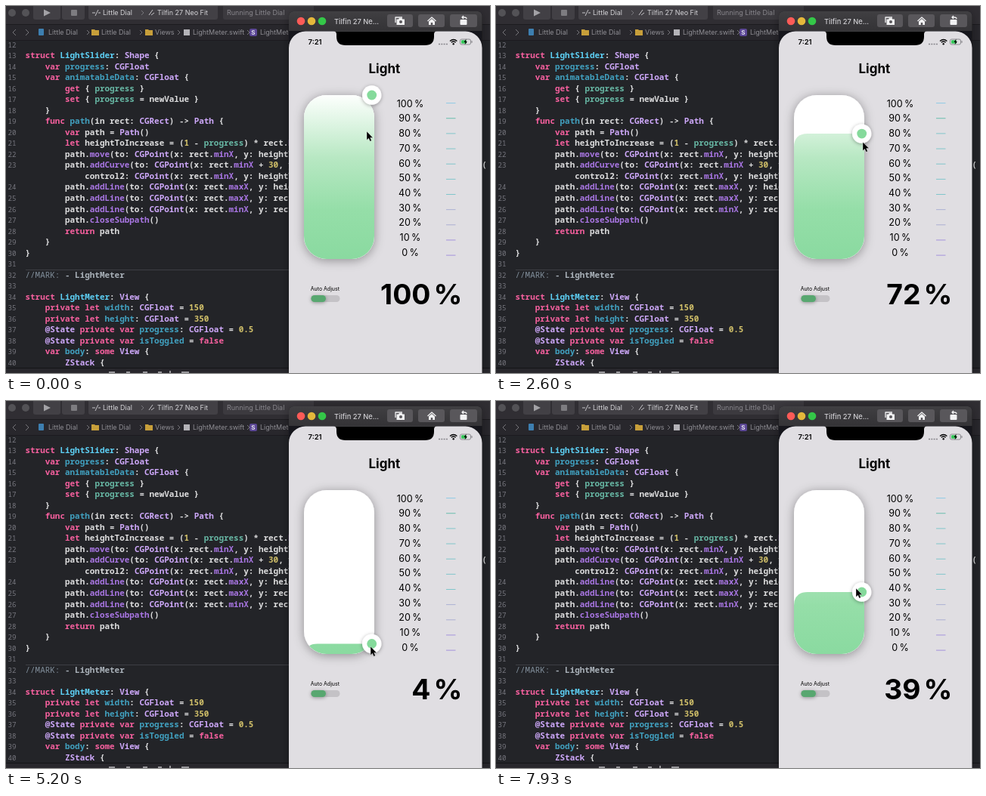
An HTML page for the animation above (8 s loop, 640x486 px).

```html
<!DOCTYPE html>
<html lang="en">
<head>
<meta charset="utf-8">
<title>Light slider</title>
<style>
  html, body { margin: 0; width: 100%; height: 100%; overflow: hidden; background: #232428; }
  svg { display: block; width: 100vw; height: 100vh; font-family: Inter, Roboto, sans-serif; }
  text { white-space: pre; }
  #code { font: 600 10.95px "Noto Sans Mono", "DejaVu Sans Mono", monospace; fill: #dededf; }
  #code .num { font-size: 9.2px; font-weight: 400; fill: #77777f; text-anchor: end; }
  .key { fill: #f7609f; font-weight: bold; }
  .type { fill: #cfa9fb; }
  .member { fill: #a976e4; }
  .decl { fill: #41a1c0; }
  .struct { fill: #5dd0f5; }
  .prop { fill: #67b7a4; }
  .lit { fill: #d0bf69; }
  .note { fill: #7f8c98; font-weight: 400; }
  .mark { fill: #aab2ba; }
  .bar { font-size: 9px; fill: #8f8e94; }
  .chev { fill: none; stroke: #77767b; stroke-width: 1; }
  .icon { fill: none; stroke: #f2f2f3; stroke-width: 1.3; stroke-linejoin: round; }
</style>
</head>
<body>
<svg viewBox="0 0 640 486" preserveAspectRatio="none">
  <defs>
    <linearGradient id="green" gradientUnits="userSpaceOnUse" x1="0" y1="118" x2="0" y2="335">
      <stop offset="0" stop-color="#fdfffd"/>
      <stop offset=".38" stop-color="#b8e8c3"/>
      <stop offset=".7" stop-color="#95dea8"/>
      <stop offset="1" stop-color="#8adaa0"/>
    </linearGradient>
    <linearGradient id="title" x2="0" y2="1">
      <stop offset="0" stop-color="#403f42"/>
      <stop offset="1" stop-color="#343336"/>
    </linearGradient>
    <clipPath id="tube"><rect x="394" y="118" width="93" height="217" rx="30"/></clipPath>
    <filter id="soft" x="-40%" y="-40%" width="180%" height="180%">
      <feDropShadow dx="0" dy="2" stdDeviation="7" flood-color="#000" flood-opacity=".36"/>
    </filter>
    <filter id="lift" x="-60%" y="-60%" width="220%" height="220%">
      <feDropShadow dx="0" dy="1" stdDeviation="2.5" flood-color="#000" flood-opacity=".35"/>
    </filter>
  </defs>

  <rect width="640" height="486" fill="#232428"/>
  <g id="code"></g>
  <path d="M26 349.5H374" stroke="#3e3f44"/>

  <!-- editor bars -->
  <rect width="640" height="24" fill="#302e33"/>
  <rect y="24" width="640" height="21" fill="#28272c"/>
  <path d="M0 24.5H640M0 45.5H640" stroke="#1c1b1f"/>
  <g fill="#535256">
    <circle cx="8" cy="9" r="5"/><circle cx="26" cy="9" r="5"/>
  </g>
  <g fill="#424045">
    <rect x="36" y="-4" width="36" height="22" rx="3"/>
    <rect x="74" y="-4" width="30" height="22" rx="3"/>
    <rect x="109" y="-4" width="171" height="22" rx="3"/>
    <rect x="287" y="-4" width="120" height="22" rx="3" fill="#3c3a3f"/>
  </g>
  <path d="M50 4.500L59 9L50 13.500Z" fill="#a3a2a6"/>
  <rect x="86" y="5" width="8" height="8" rx="1" fill="#7d7c80"/>
  <path d="M114 9h4m4-4l-4 8m4-4h3M189 12l5-7m-2 7l4-3" stroke="#c5c4c8" fill="none"/>
  <path class="chev" d="M179 6l3 3l-3 3"/>
  <g class="bar" style="fill:#d3d2d6">
    <text x="128" y="12.300">Little Dial</text>
    <text x="200" y="12.300">Tilfin 27 Neo Fit</text>
    <text x="292" y="12.300" style="fill:#88868c">Running Little Dial</text>
  </g>
  <path class="chev" d="M13 31l-4 4l4 4M26 31l4 4l-4 4M107 32l3 3l-3 3M177 32l3 3l-3 3M227 32l3 3l-3 3M319 32l3 3l-3 3"/>
  <rect x="43" y="30" width="7" height="9" rx="1" fill="#3d7fb0"/>
  <path id="folder" d="M113 31h4l1 1h5v7h-10Z" fill="#c79f3a"/>
  <use href="#folder" x="71"/>
  <rect x="235" y="31" width="8" height="8" fill="#b4b3b8"/>
  <rect x="322" y="30" width="10" height="10" rx="2" fill="#5b4795"/>
  <text x="324.300" y="38" font-size="8" font-weight="700" fill="#e6e3f0">S</text>
  <g class="bar">
    <text x="56" y="38">Little Dial</text>
    <text x="126" y="38">Little Dial</text>
    <text x="197" y="38">Views</text>
    <text x="247" y="38">LightMeter.swift</text>
    <text x="336" y="38">LightMeter</text>
  </g>
  <rect y="479" width="640" height="7" fill="#28272c"/>
  <path d="M0 479.500H640" stroke="#141417"/>
  <path d="M136 485h8M159 485h5M181 485h6M201 485h5M217 483v3M232 485h10" stroke="#98979b" stroke-width="2"/>

  <!-- simulator -->
  <path d="M374 486V13a6 6 0 0 1 6-6H623.500a6 6 0 0 1 6 6V486Z" fill="#17171a" filter="url(#soft)"/>
  <path d="M374 33V13a6 6 0 0 1 6-6H623.500a6 6 0 0 1 6 6V33Z" fill="url(#title)"/>
  <circle cx="390" cy="20" r="5.300" fill="#fc5b57"/>
  <circle cx="404" cy="20" r="5.300" fill="#e5b73b"/>
  <circle cx="418" cy="20" r="5.300" fill="#34c748"/>
  <text x="434" y="23.500" font-size="9.300" font-weight="500" fill="#cfced2">Tilfin 27 Ne...</text>
  <g fill="#59575b">
    <rect x="504" y="11" width="34" height="17" rx="3"/>
    <rect x="545" y="11" width="35" height="17" rx="3"/>
    <rect x="587" y="11" width="36" height="17" rx="3"/>
  </g>
  <path class="icon" d="M515 22v-7h9"/>
  <path d="M516.500 17.500h2.500l1-1.500h3.500l1 1.500h2.500v7.500h-10.500Z" fill="#f2f2f3"/>
  <circle cx="522" cy="21" r="2" fill="#59575b"/>
  <path class="icon" d="M557.500 20l5.500-5l5.500 5"/>
  <path d="M559 20.500l4-3.500l4 3.500v4.500h-2.800v-3h-2.400v3h-2.800Z" fill="#f2f2f3"/>
  <rect x="600.500" y="18" width="9" height="7" rx="1" fill="#f2f2f3"/>
  <path class="icon" d="M603 15h3q3 0 3 2M605 13l-2 2l2 2"/>

  <path d="M374 486V55.500a22 22 0 0 1 22-22H607.500a22 22 0 0 1 22 22V486Z" fill="#e0dee2"/>
  <path d="M433 33.500q4 0 4 4v3q0 11.500 12 11.500H554q12 0 12-11.500v-3q0-4 4-4Z" fill="#000"/>
  <text x="399.500" y="51.300" font-size="9.500" font-weight="600">7:21</text>
  <path d="M572 50.500h12" stroke="#85848a" stroke-width="1.600" stroke-dasharray="2 1.300"/>
  <path d="M587 46.500q4.700-4 9.400 0M588.700 48.300q3-2.600 6 0" fill="none" stroke="#000" stroke-width="1.400"/>
  <circle cx="591.700" cy="50.300" r="1.200"/>
  <rect x="600.500" y="44" width="14" height="7" rx="2" fill="none" stroke="#77767b" stroke-width=".8"/>
  <rect x="602" y="45.300" width="7" height="4.400" rx="1" fill="#34c759"/>
  <path d="M608.500 43.500l-3 4.500h2l-1 3.500l3.500-4.500h-2Z"/>
  <path d="M616 46.200v2.600" stroke="#77767b"/>

  <text x="479.500" y="89" font-size="17" font-weight="700">Light</text>
  <rect x="394" y="118" width="93" height="217" rx="30" fill="#fff" filter="url(#soft)"/>
  <path id="level" fill="url(#green)" clip-path="url(#tube)"/>
  <g id="scale" font-size="12.600" text-anchor="middle" word-spacing="-1.2"></g>

  <text x="402.700" y="377.300" font-size="7">Auto Adjust</text>
  <rect x="403" y="383" width="38.500" height="9" rx="4.500" fill="#c4c2c6"/>
  <rect x="403.500" y="383" width="19.500" height="9" rx="4.500" fill="#58a770" filter="url(#lift)"/>
  <g font-size="37.300" font-weight="700" text-anchor="end">
    <text id="value" x="561.500" y="395"></text>
    <text x="603.500" y="395">%</text>
  </g>

  <g id="knob">
    <circle r="12.700" fill="#fff" filter="url(#lift)"/>
    <circle r="6.400" fill="#85da9b"/>
  </g>
  <path id="cursor" d="M0 0V11.500L2.600 9.200L4.400 13.200L6.400 12.300L4.700 8.400H8.200Z" fill="#000" stroke="#fff" stroke-opacity=".55" stroke-width=".7"/>
</svg>

<script>
const $ = id => document.getElementById(id);

const source = `

struct LightSlider: Shape {
    var progress: CGFloat
    var animatableData: CGFloat {
        get { progress }
        set { progress = newValue }
    }
    func path(in rect: CGRect) -> Path {
        var path = Path()
        let heightToIncrease = (1 - progress) * rect.height
        path.move(to: CGPoint(x: rect.minX, y: heightToIncrease))
        path.addCurve(to: CGPoint(x: rect.minX + 30, y: heightToIncrease), control1: CGPoint(
            control2: CGPoint(x: rect.minX, y: heightToIncrease))
        path.addLine(to: CGPoint(x: rect.maxX, y: heightToIncrease))
        path.addLine(to: CGPoint(x: rect.maxX, y: rect.maxY))
        path.addLine(to: CGPoint(x: rect.minX, y: rect.maxY))
        path.closeSubpath()
        return path
    }
}

//MARK: - LightMeter

struct LightMeter: View {
    private let width: CGFloat = 150
    private let height: CGFloat = 350
    @State private var progress: CGFloat = 0.5
    @State private var isToggled = false
    var body: some View {
        ZStack {`.split("\n").slice(1);

const rules = [
  ["note", "//MARK:"],
  ["mark", "(?<=//MARK: ).*"],
  ["struct", "(?<=struct )\\w+"],
  ["decl", "(?<=^ {4}\\S.*(?:var|let|func) |^ {4}(?:var|let|func) )\\w+(?=[:(]| =)"],
  ["key", "\\b(?:struct|var|let|func|get|set|return|private|some|false)\\b"],
  ["type", "@State|\\b(?:CG\\w+|Shape|Path|View|ZStack)\\b"],
  ["member", "(?<=\\.)[a-z]\\w*"],
  ["prop", "\\bprogress\\b"],
  ["lit", "\\b\\d[\\d.]*"]
];
const syntax = new RegExp(rules.map(([name, re]) => `(?<${name}>${re})`).join("|"), "g");

function paint(line) {
  return line.replace(syntax, (word, ...rest) => {
    const groups = rest[rest.length - 1];
    const name = Object.keys(groups).find(k => groups[k] !== undefined);
    return `<tspan class="${name}">${word}</tspan>`;
  });
}

let number = 12;
$("code").innerHTML = source.map((line, i) => {
  const y = 54.7 + i * 14.52;
  const wrapped = line.trim().startsWith("control2");
  const label = wrapped ? "" : `<text class="num" x="13.500" y="${y}">${number++}</text>`;
  return `${label}<text x="25.500" y="${y}">${paint(line)}</text>`;
}).join("");

const tickColor = i => i === 0 ? "#8fcbe5" : i === 1 ? "#68bdac" : i < 7 ? "#80c6cb" : i < 9 ? "#abb0d3" : "#a493dc";
$("scale").innerHTML = Array.from({ length: 11 }, (_, i) => {
  const y = 128.6 + i * 20.15;
  return `<text x="534.500" y="${133.7 + i * 19.72}">${100 - i * 10} %</text>
    <path d="M582 ${y}h12.500" stroke="${tickColor(i)}"/>`;
}).join("");

// time, cursor x, cursor y, knob y, percent
const steps = [
  [0, 477, 166, 118, 100],
  [870, 477, 166, 118, 100],
  [1330, 484, 119, 118, 100],
  [1733, 485, 137, 134.5, 91],
  [3400, 485, 220, 201, 54],
  [4400, 483, 278, 269.5, 26],
  [5200, 482, 325, 321.5, 4],
  [5600, 481, 336, 333, 0],
  [6000, 480, 343, 334, 0],
  [6270, 480, 343, 334, 0],
  [6400, 480, 334, 333, 0],
  [6600, 479, 314, 321.5, 8],
  [7933, 476, 248, 253, 39],
  [8000, 476, 246, 250, 40]
];

function pose(t) {
  const i = Math.max(1, steps.findIndex(s => s[0] > t));
  const a = steps[i - 1], b = steps[i];
  const k = (t - a[0]) / (b[0] - a[0]);
  return a.map((v, n) => v + (b[n] - v) * k);
}

const LOOP = 8000, TICK = 1000 / 15;

function draw(now) {
  const t = Math.floor((now % LOOP + 4) / TICK) * TICK % LOOP;
  const [, x, y, knob, percent] = pose(t);
  $("cursor").setAttribute("transform", `translate(${x} ${y})`);
  $("knob").setAttribute("transform", `translate(483.700 ${knob})`);
  $("level").setAttribute("d",
    `M394 336V${knob + 18}Q394 ${knob} 412 ${knob}H469Q487 ${knob} 487 ${knob + 18}V336Z`);
  $("value").textContent = Math.round(percent);
}

const start = performance.now();
function loop() {
  draw(performance.now() - start);
  requestAnimationFrame(loop);
}
loop();
</script>
</body>
</html>
```
